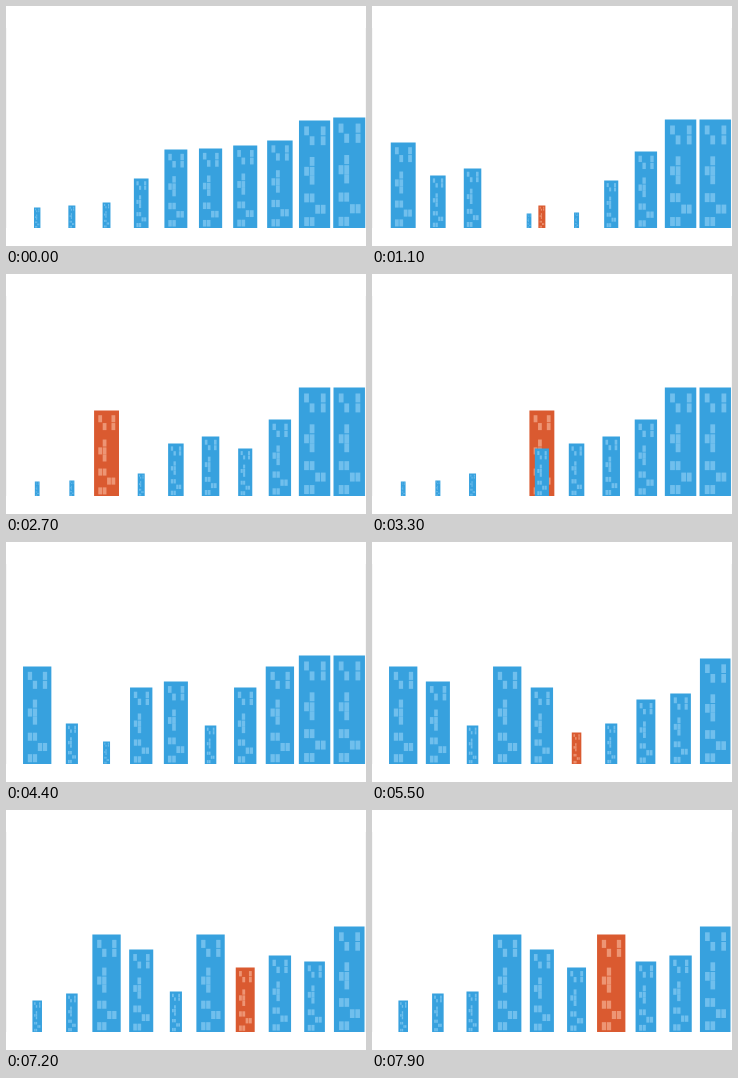
Animation, 360 px wide and 240 px high, one loop 8000 ms. Source, as an HTML page with a canvas:

```html
<!DOCTYPE html>
<html lang="en">
<head>
<meta charset="utf-8">
<title>Bubble sort skyline</title>
<style>
html, body { margin: 0; width: 100%; height: 100%; overflow: hidden; background: #fff; }
canvas { display: block; }
</style>
</head>
<body>
<canvas id="stage"></canvas>
<script>
const W = 360, H = 240, LOOP = 8000;
const GROUND = 222, FIRST_X = 31.2, GAP = 34.67;
const SWAP = 171;
const BLUE = { wall: '#37a1de', glass: '#70bfed' };
const RED = { wall: '#da5a30', glass: '#ed9574' };

// Window rows of a tower 31 wide and 109 high: top edge and filled columns.
const TOWER_W = 31, TOWER_H = 109;
const FACADE = [
  [6, '#  #'], [16, ' # #'],
  [37, ' #'], [47, '##'], [56, ' #'],
  [74, '##'], [85.5, '  ##'], [98, '##']
];

const canvas = document.getElementById('stage');
const ctx = canvas.getContext('2d');
const dpr = window.devicePixelRatio || 1;
canvas.width = W * dpr;
canvas.height = H * dpr;
canvas.style.width = W + 'px';
canvas.style.height = H + 'px';

const scenes = [];
const add = (t, bars, extra) => scenes.push({ t, bars: bars.slice(), ...extra });

// Replaces the bars that differ one by one, hopping along the row.
function rebuild(from, to, start, tick) {
  const bars = from.slice();
  let t = start;
  for (let k = 0; k < bars.length; k++) {
    const slot = (4 + 7 * k) % bars.length;
    if (!to[slot] || to[slot] === bars[slot]) continue;
    bars[slot] = to[slot];
    add(t, bars);
    t += tick;
  }
  return bars;
}

// Bubble passes from right to left; every swap takes the same time.
function sort(list, start) {
  const bars = list.slice();
  const last = bars.length - 1;
  let t = start;
  add(start - 78, bars, { red: last });
  for (let pass = 0; pass < last; pass++) {
    for (let j = last - 1; j >= pass; j--) {
      if (bars[j] <= bars[j + 1]) continue;
      add(t, bars, { swap: j });
      [bars[j], bars[j + 1]] = [bars[j + 1], bars[j]];
      t += SWAP;
    }
  }
  add(t, bars);
  return bars;
}

const opening = [21, 23, 26, 50, 79, 80, 83, 88, 108, 111];
const firstCity = [86, 53, 60, 23, 15, 16, 48, 77, 109, 109];
const halfBuilt = [98, 41, , 77, 83, 39, , 98];
const secondCity = [98, 83, 39, 98, 77, 41, 65, 71, 106, 32];

add(0, opening);
rebuild(opening, firstCity, 50, 60);
const sorted = sort(firstCity, 969);
const mixed = rebuild(sorted, halfBuilt, 3960, 75);
rebuild(mixed, secondCity, 4410, 38);
sort(secondCity, 4807);

function tower(slot, height, { wall, glass }) {
  const h = height - 0.5;
  const s = h / TOWER_H;
  const w = TOWER_W * s + 0.6;
  ctx.save();
  ctx.translate(FIRST_X + slot * GAP, GROUND - h);
  ctx.fillStyle = wall;
  ctx.fillRect(-w / 2, 0, w, h);
  ctx.scale(s, s);
  ctx.fillStyle = glass;
  for (const [y, row] of FACADE) {
    [...row].forEach((cell, col) => {
      if (cell === '#') ctx.fillRect(-10.5 + col * 5.6, y, 4.8, 9);
    });
  }
  ctx.restore();
}

const ramp = (t, a, b) => Math.min(1, Math.max(0, (t - a) / (b - a)));

function draw(time) {
  const scene = scenes.findLast(s => s.t <= time);
  const { bars, swap = -2, red } = scene;
  const age = time - scene.t;

  ctx.setTransform(dpr, 0, 0, dpr, 0, 0);
  ctx.fillStyle = '#fff';
  ctx.fillRect(0, 0, W, H);
  ctx.fillStyle = '#f8f8f8';
  ctx.fillRect(0, 22, 1, 200);
  ctx.fillRect(359, 22, 1, 200);

  // The taller tower steps right first, then the other one steps left.
  const marked = swap < 0 ? red : age < 12 ? swap + 1 : swap;
  bars.forEach((h, i) => {
    let slot = i;
    if (i === swap) slot += ramp(age, 30, 100);
    if (i === swap + 1) slot -= ramp(age, 109, SWAP);
    tower(slot, h, i === marked ? RED : BLUE);
  });
}

function frame() {
  draw(performance.now() % LOOP);
  requestAnimationFrame(frame);
}
frame();
</script>
</body>
</html>
```
